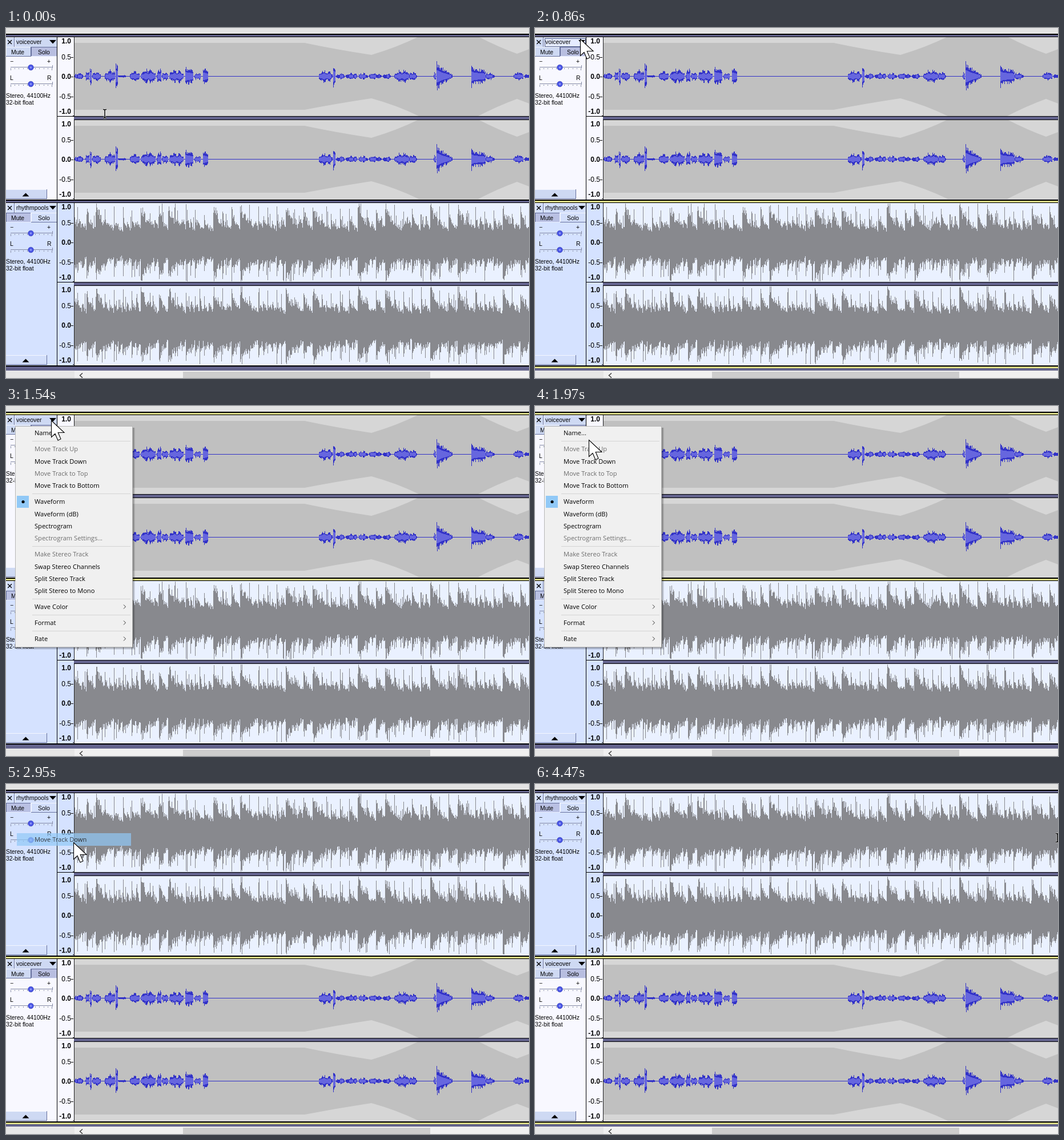
Write an HTML page that moves like this. It is 916 by 612 pixels and loops after 4.59 s.

```html
<!DOCTYPE html>
<html lang="en">
<head>
<meta charset="utf-8">
<title>Move a track down</title>
<style>
  html, body { margin: 0; width: 100%; height: 100%; overflow: hidden; background: #e3e3e3; }
  svg { display: block; width: 916px; height: 612px; }
  text { font-family: "Liberation Sans", Arial, sans-serif; font-size: 10.4px; fill: #000; white-space: pre; }
  .axis { font-size: 12px; text-anchor: end; }
  .bold { font-weight: bold; }
  .menu text { font-family: "Open Sans", "Noto Sans", sans-serif; font-size: 11.1px; }
  .menu .off { fill: #6d6d6d; }
  .crisp { shape-rendering: crispEdges; }
  .anim { animation: 4590ms step-end infinite; }
</style>
</head>
<body>
<svg id="stage" viewBox="0 0 916 612"></svg>
<script>
const LOOP = 4590;
const SLATE = '#63638c';

const rect = (x, y, w, h, fill, extra = '') =>
  `<rect class="crisp" x="${x}" y="${y}" width="${w}" height="${h}" fill="${fill}" ${extra}/>`;
const path = (d, fill, extra = '') => `<path d="${d}" fill="${fill}" ${extra}/>`;
const text = (x, y, s, cls = '') => `<text x="${x}" y="${y}" class="${cls}">${s}</text>`;
const group = (body, id = '', cls = '') => `<g id="${id}" class="${cls}">${body}</g>`;
const bars = (d, color) =>
  `<path class="crisp" d="${d}" stroke="${color}" stroke-width="1" fill="none"/>`;

function random(seed) {
  return () => {
    seed = (seed + 0x6D2B79F5) | 0;
    let t = Math.imul(seed ^ (seed >>> 15), 1 | seed);
    t = (t + Math.imul(t ^ (t >>> 7), 61 | t)) ^ t;
    return ((t ^ (t >>> 14)) >>> 0) / 4294967296;
  };
}

// Speech bursts: start, end, first height, last height
const BURSTS = [
  [120, 135, 6, 7], [139, 146, 9, 12], [147, 150, 19, 15], [151, 166, 10, 9],
  [173, 191, 13, 12], [192, 196, 26, 22], [196, 211, 2, 2], [217, 234, 12, 10],
  [236, 262, 14, 15], [264, 272, 13, 20], [273, 284, 11, 7], [286, 311, 14, 12],
  [314, 328, 18, 12], [330, 341, 8, 7], [345, 354, 17, 10], [548, 572, 14, 10],
  [573, 577, 24, 18], [578, 593, 4, 7], [595, 615, 6, 6], [618, 634, 9, 4],
  [636, 658, 8, 3], [660, 674, 5, 5], [680, 706, 11, 14], [706, 720, 11, 5],
  [749, 753, 7, 9], [754, 761, 27, 20], [761, 782, 18, 2], [815, 819, 22, 17],
  [819, 840, 16, 11], [840, 856, 10, 3], [889, 906, 8, 9], [908, 916, 4, 4]
];

function voiceWave(mid) {
  const rnd = random(11);
  let peak = `M120 ${mid + .5}H916`, core = '';
  for (const [x0, x1, a0, a1] of BURSTS) {
    for (let x = x0; x < x1; x++) {
      const u = (x - x0) / (x1 - x0);
      const syllable = Math.min(1, .3 + 4 * Math.min(u, 1 - u)) * (.8 + .2 * Math.cos((x - x0) * .72));
      const a = (a0 + (a1 - a0) * u) * (a0 < 15 ? syllable : 1);
      const up = Math.round(a * (.5 + .48 * rnd())), down = Math.round(a * (.5 + .44 * rnd()));
      peak += `M${x + .5} ${mid - up}V${mid + 1 + down}`;
      const c = Math.round(a * .38);
      if (c > 1) core += `M${x + .5} ${mid - c}V${mid + 1 + c}`;
    }
  }
  return bars(peak, '#3232c8') + bars(core, '#6666de');
}

// Music: every beat strikes and decays; beats 0 and 5 of each eight are loud
function musicWave(mid, seed) {
  const rnd = random(seed), beat = 15.84;
  let d = '', last = -99, gain = 1;
  for (let x = 120; x < 916; x++) {
    const k = (x - 156.5) / beat, now = Math.floor(k), half = Math.floor(k * 2);
    if (half !== last) { last = half; gain = .4 + rnd(); }
    let hit = 0;
    for (let j = now; j > now - 5; j--) {
      const slot = ((j % 8) + 8) % 8, age = (k - j) * beat;
      const loud = slot === 0 || slot === 5, soft = slot === 7;
      hit = Math.max(hit, (loud ? 44 : soft ? 36 : 24) * Math.exp(-age / (loud ? 14 : soft ? 9 : 7)));
    }
    const age = (k - now) * beat;
    hit = Math.max(hit, 19 * gain * Math.exp(-(k * 2 - half) * beat / 12));
    let up = (20 + hit) * (.8 + .38 * rnd()), down = (25 + hit * .95) * (.8 + .38 * rnd());
    if (age < 1) { up = 48 + 20 * rnd(); down = 48 + 20 * rnd(); }
    else if (rnd() < .07) { up += 26 * rnd(); down += 28 * rnd(); }
    d += `M${x + .5} ${Math.round(mid - Math.min(up, 68))}V${Math.round(mid + Math.min(down, 68))}`;
  }
  return bars(d, '#88898e');
}

const envelope = top => path(
  `M120 ${top + 11}H523Q580 ${top + 23} 640 ${top + 32}Q684 ${top + 19} 723 ${top}H827` +
  `Q862 ${top + 18} 895 ${top + 30}L916 ${top + 22}V${top + 117}L895 ${top + 109}` +
  `Q862 ${top + 121} 827 ${top + 139}H723Q684 ${top + 120} 640 ${top + 108}` +
  `Q580 ${top + 117} 523 ${top + 128}H120Z`, '#c0c0c0');

function button(x, y, w, h, fill, pressed) {
  const [a, b] = pressed ? ['#66709c', '#e8eeff'] : ['#f4f7ff', '#66709c'];
  return rect(x, y, w, h, fill) + rect(x, y, w, 1, a) + rect(x, y, 1, h, a) +
    rect(x, y + h - 1, w, 1, b) + rect(x + w - 1, y, 1, h, b);
}

function slider(y, left, right) {
  let ticks = '';
  for (let i = 0; i <= 10; i++) ticks += rect(8 + Math.round(i * 7.2), y + 1, 1, i % 5 ? 2 : 4, '#8c92a8');
  return text(7, y - 7, left) + text(72, y - 7, right) +
    rect(8, y - 1, 73, 1, '#858ba4') + rect(81, y - 4, 1, 5, '#858ba4') + ticks +
    `<circle cx="43.5" cy="${y}" r="4.8" fill="#4a55e6" stroke="#3740b4" stroke-width=".7"/>` +
    `<circle cx="43.5" cy="${y}" r="1.8" fill="#8f98f8"/>`;
}

function axis(y) {
  const marks = [['1.0', 27], ['0.5', 55], ['0.0', 89], ['-0.5', 124], ['-1.0', 150]];
  return marks.map(([s, b], i) =>
    text(114, b + y, s, 'axis' + (i % 2 ? '' : ' bold')) +
    (i % 4 ? rect(114, b + y - 4, 4, 1, '#000') : '')).join('') +
    rect(117, 153 + y, 2, 1, '#000');
}

function track(name, o) {
  let s = rect(0, 15, 120, 285, o.panel) + rect(120, 15, 796, 285, o.back) + o.wave;
  s += button(0, 16, 15, 18, o.light) + button(15, 16, 75, 18, o.light);
  s += o.hover ? group(rect(17, 18, 71, 14, '#e6ecff', 'stroke="#55608c"'), 'hover', 'anim') : '';
  s += path('M3.2 21.2L10 28M10 21.2L3.2 28', 'none', 'stroke="#000" stroke-width="1.3"');
  s += text(18, 28, name) + path('M76 21H88L82 27.5Z', '#000');
  s += button(0, 33, 44, 17, o.muted ? o.dark : o.light, o.muted) + text(9, 45.5, 'Mute');
  s += button(44, 33, 46, 17, o.muted ? o.light : o.dark, !o.muted) + text(56, 45.5, 'Solo');
  s += slider(69, '−', '+') + slider(98, 'L', 'R');
  s += text(0, 122, 'Stereo, 44100Hz') + text(0, 134, '32-bit float');
  s += button(-1, 282, 73, 17, o.light) + path('M28.5 294.5H40.5L34.5 288.5Z', '#000');
  s += axis(0) + axis(145);
  s += rect(89, 15, 1, 285, '#000') + rect(119, 15, 1, 285, '#222') + rect(90, 154, 30, 1, '#000');
  s += rect(119, 154, 797, 7, '#000') + rect(119, 155, 797, 5, SLATE);
  return s;
}

const voice = group(track('voiceover', {
  panel: '#f8f8ff', back: '#d6d6d6', light: '#ced9f3', dark: '#b8bee0', hover: true,
  wave: envelope(15) + envelope(160) + voiceWave(84) + voiceWave(229)
}), 'voice', 'anim');

const music = group(track('rhythmpools', {
  panel: '#d5e2ff', back: '#eaf1ff', light: '#d3dffb', dark: '#b9c0e3', muted: true,
  wave: musicWave(85, 5) + musicWave(230, 8)
}), 'music', 'anim');

const frame = [10, 300, 590].map(y => rect(0, y, 916, 6, '#000') + rect(0, y + 2, 916, 3, SLATE)).join('') +
  rect(0, 592, 916, 7, SLATE);
const scroll = rect(0, 599, 916, 13, '#e6e6e6') + rect(120, 600, 796, 12, '#f0f0f0') +
  rect(310, 601, 433, 11, '#cdcdcd') +
  path('M134 603.5L129.5 607.5L134 611.5', 'none', 'stroke="#404040" stroke-width="1.6"');
const focus = group([12, 302].map(y =>
  rect(0, y, 916, 3, '#c6c672') + rect(0, y + 1, 916, 1, '#ebeb9a')).join(''), 'focus', 'anim');

function menu() {
  const items = [
    ['Name...', 47], ['Move Track Up', 75, 1], ['Move Track Down', 96.5], ['Move Track to Top', 118, 1],
    ['Move Track to Bottom', 139], ['Waveform', 167], ['Waveform (dB)', 188.5], ['Spectrogram', 210],
    ['Spectrogram Settings...', 231, 1], ['Make Stereo Track', 259, 1], ['Swap Stereo Channels', 280.5],
    ['Split Stereo Track', 301.5], ['Split Stereo to Mono', 323], ['Wave Color', 351],
    ['Format', 379], ['Rate', 407]
  ];
  let s = '';
  for (let i = 5; i > 0; i--) s += rect(18, 38, 203 + i, 383 + i, '#000', 'opacity=".09"');
  s += rect(16, 35, 206, 387, '#b8b8b8') + rect(17, 36, 204, 385, '#f0f0f0');
  s += group(rect(19, 37, 200, 22, '#91c9f7'), 'pickName', 'anim');
  s += group(rect(19, 86, 200, 22, '#91c9f7'), 'pickDown', 'anim');
  for (const y of [61, 153, 245, 337, 365, 393]) s += rect(46, y, 172, 1, '#d4d4d4');
  s += rect(19, 157, 21, 21, '#91c9f7') + '<circle cx="30" cy="167.5" r="2.6"/>';
  for (const [label, y, off] of items) s += text(50, y + 4, label, off ? 'off' : '');
  for (const y of [351, 379, 407])
    s += path(`M206 ${y - 3.5}L209.5 ${y}L206 ${y + 3.5}`, 'none', 'stroke="#333" stroke-width="1"');
  return group(s, 'menu', 'menu anim');
}

const ghost = group(rect(19, 86, 200, 22, '#91c9f7') + text(50, 100.5, 'Move Track Down'), 'ghost', 'menu anim');
const arrow = group(path('M.5 .5V29.5L7 23.5L12 35L17 32.8L12.2 21.5H23Z', '#fff',
  'stroke="#000" stroke-width="1.1"'), 'arrow', 'anim');
const caretPath = 'M-3 -7.5H-1L0 -6.5L1 -7.5H3M0 -6.5V6.5M-3 7.5H-1L0 6.5L1 7.5H3';
const beam = group(path(caretPath, 'none', 'stroke="#fff" stroke-width="3" opacity=".75"') +
  path(caretPath, 'none', 'stroke="#000" stroke-width="1.5"'), 'beam', 'anim');

document.getElementById('stage').innerHTML =
  rect(0, 0, 916, 612, '#e3e3e3') + voice + music + frame + scroll + focus + menu() + ghost + arrow + beam;

// Held poses: [ms, declarations]
const sheet = document.createElement('style');
function hold(id, poses) {
  const keys = poses.map(([ms, css]) => `${(Math.max(0, ms - 1) / LOOP * 100).toFixed(3)}%{${css}}`);
  sheet.textContent += `@keyframes ${id}{${keys.join('')}100%{${poses[poses.length - 1][1]}}}` +
    `#${id}{animation-name:${id}}\n`;
}
const at = (x, y) => `opacity:1;transform:translate(${x}px,${y}px)`;
const alpha = a => `opacity:${a}`;
const gone = 'opacity:0;transform:translate(0px,0px)';

hold('voice', [[0, at(0, 0)], [2950, at(0, 290)]]);
hold('music', [[0, at(0, 290)], [2950, at(0, 0)]]);
hold('focus', [[0, gone], [860, at(0, 290)], [980, at(0, 0)], [2950, at(0, 290)]]);
hold('hover', [[0, alpha(0)], [640, alpha(1)], [980, alpha(0)]]);
hold('menu', [[0, alpha(0)], [980, alpha(.6)], [1100, alpha(1)], [2950, alpha(0)]]);
hold('pickName', [[0, alpha(0)], [1740, alpha(1)], [1970, alpha(0)]]);
hold('pickDown', [[0, alpha(0)], [2300, alpha(1)], [2950, alpha(0)]]);
hold('ghost', [[0, alpha(0)], [2950, alpha(.7)], [3060, alpha(.35)], [3160, alpha(0)]]);
hold('arrow', [
  [0, gone], [340, at(110, 66)], [440, at(92, 42)], [540, at(82, 27)], [640, at(79, 19)],
  [1540, at(79, 25)], [1630, at(81, 33)], [1740, at(85, 43)], [1850, at(90, 52)], [1970, at(94, 59)],
  [2100, at(97, 64)], [2200, at(102, 75)], [2300, at(109, 87)], [2410, at(115, 97)], [2520, at(118, 102)],
  [3920, gone]
]);
hold('beam', [
  [0, at(173, 150)], [120, at(166, 138)], [230, at(142, 102)], [340, gone],
  [3920, at(187, 107)], [4050, at(410, 126)], [4150, at(724, 132)], [4250, gone], [4470, at(915, 94)]
]);
document.head.append(sheet);
</script>
</body>
</html>
```
